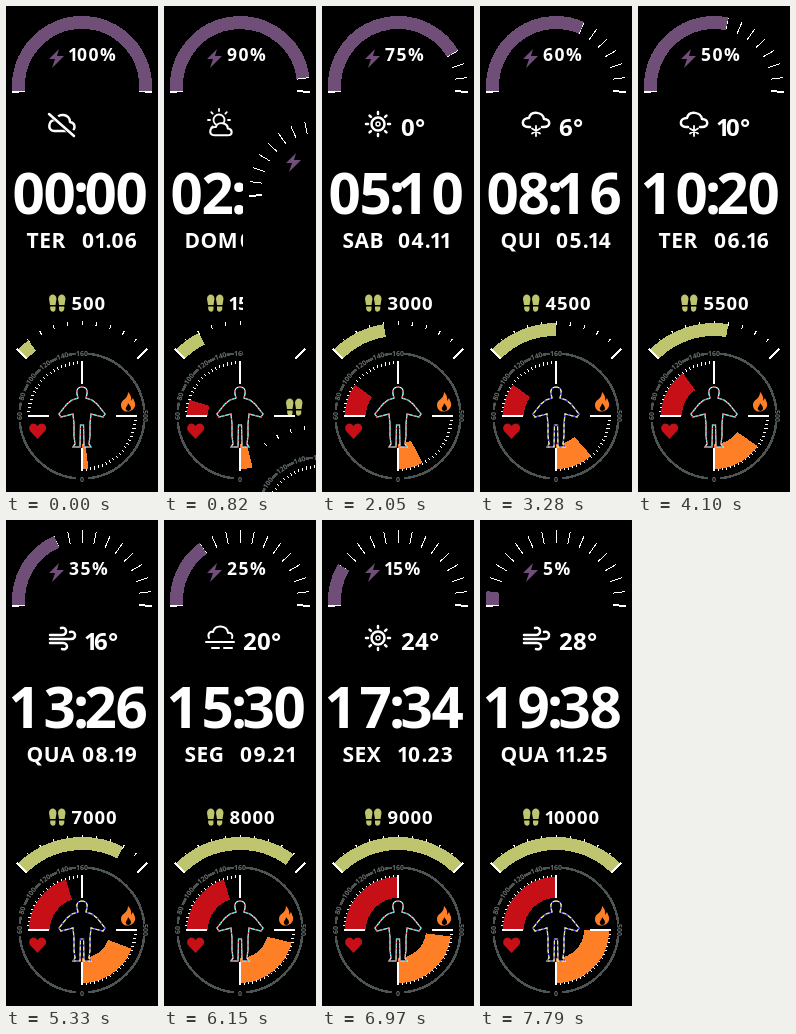
Animation, 152 px wide and 486 px high, one loop 8200 ms. Source, as an HTML page:

```html
<!DOCTYPE html>
<html lang="pt">
<head>
<meta charset="utf-8">
<style>
html, body { margin: 0; width: 100%; height: 100%; overflow: hidden; background: #000; }
svg { display: block; width: 152px; height: 486px; }
text { font-family: "Open Sans", "Noto Sans", sans-serif; font-weight: 700; fill: #fff; }
.crisp { shape-rendering: crispEdges; }
.tick { stroke: #fff; fill: none; shape-rendering: crispEdges; }
.line { stroke: #fff; stroke-width: 2; fill: none; shape-rendering: crispEdges; }
.small { font-size: 7px; fill: #66706d; text-anchor: middle; }
.icon { fill: none; stroke: #fff; stroke-width: 2.5; stroke-linecap: round; stroke-linejoin: round; }
</style>
</head>
<body>
<svg viewBox="0 0 152 486">
  <defs>
    <clipPath id="leftSide"><path d="M0 0H152V104H79V486H0Z"/></clipPath>
    <clipPath id="corner"><path d="M79 104H152V486H79Z"/></clipPath>
    <path id="man" d="M0-29C4-29 6-26 5-22L4-18 10-16 15-12 23-2 21 1 9-2 8 8 8 20 7 28 9 31 2 31 1.500 9H0M0-29C-4-29-6-26-5-22L-4-18-10-16-15-12-23-2-21 1-9-2-8 8-8 20-7 28-9 31-2 31-1.500 9H0"/>
  </defs>
  <rect width="152" height="486"/>
  <g id="base">
    <path id="batteryTicks" class="tick"/>
    <path id="batteryEnds" class="line"/>
    <path d="M53 43 43 53H49L46 62 58 50H51Z" fill="#6f4f78"/>
    <g fill="#bfc46f">
      <path id="sole" d="M43 293C43 287 50.500 287 50.500 293L49.500 299H44ZM44.200 300.500H49.500V303C49.500 307 44.500 306 44.200 303Z"/>
      <use href="#sole" transform="matrix(-1 0 0 1 102.500 0)"/>
    </g>
    <path id="stepTicks" class="tick"/>
    <circle class="crisp" cx="76" cy="410" r="62.500" fill="none" stroke="#4c5553" stroke-width="2.500"/>
    <g id="labels"></g>
    <path id="dialTicks" class="tick"/>
    <path d="M31.500 433 24 425C21 420 27 414 31.500 420 36 414 43 420 39 425Z" fill="#c70f18"/>
    <path d="M122 386C122 394 115 393 115 399 115 404 119 406 122 405.500 127 405 130 401 129 397L127 392 125 395C126 391 124 388 122 386Z" fill="#ff7f27"/>
    <path d="M122 397C122 400 119 401 120 403.500 121 406 125 405 125 402.500 125 400 123 399 122 397Z"/>
  </g>
  <g id="slip" clip-path="url(#corner)">
    <rect width="152" height="486"/>
    <use href="#base" x="79" y="104"/>
  </g>
  <g class="crisp" fill="none">
    <path id="battery" stroke="#6f4f78" stroke-width="13"/>
    <path id="steps" stroke="#bfc46f" stroke-width="13"/>
    <path id="heart" stroke="#c70f18" stroke-width="21"/>
    <path id="energy" stroke="#ff7f27" stroke-width="25"/>
  </g>
  <path id="marks" class="line"/>
  <path class="line" d="M22 410H43M110 410H131M76 355V378M76 442V465"/>
  <g fill="none" stroke-width="1.200">
    <use href="#man" x="76" y="410" fill="#000" stroke="#fff"/>
    <use id="manA" href="#man" x="76" y="410" stroke-dasharray="2 4"/>
    <use id="manB" href="#man" x="76" y="410" stroke-dasharray="2 4" stroke-dashoffset="3"/>
  </g>
  <g id="texts">
    <text id="charge" y="55" font-size="17.500"></text>
    <text id="temp" y="129.500" font-size="24"></text>
    <text id="clock" y="208" font-size="56.500"></text>
    <text id="day" x="20.500" y="242" font-size="21" letter-spacing=".5"></text>
    <text id="date" y="242" font-size="21"></text>
    <text id="count" y="304" font-size="18.500"></text>
  </g>
  <g id="weather" class="icon" transform="translate(56 118)"></g>
</svg>
<script>
const STEP = 410, COUNT = 20;
const $ = id => document.getElementById(id);
const pad = n => String(n).padStart(2, "0");
const days = ["DOM", "SEG", "TER", "QUA", "QUI", "SEX", "SAB"];

const point = (cy, r, deg) => {
  const a = deg * Math.PI / 180;
  return (76 + r * Math.cos(a)).toFixed(2) + " " + (cy - r * Math.sin(a)).toFixed(2);
};
const spoke = (cy, r0, r1, deg) => `M${point(cy, r0, deg)}L${point(cy, r1, deg)}`;
const spokes = (cy, r0, r1, from, gap, n) =>
  Array.from({ length: n }, (_, i) => spoke(cy, r0, r1, from + gap * i)).join("");
const arc = (cy, r, from, sweep) => sweep === 0 ? "" :
  `M${point(cy, r, from)}A${r} ${r} 0 ${+(Math.abs(sweep) > 180)} ${+(sweep < 0)} ${point(cy, r, from + sweep)}`;
const level = (p, n) => Math.min(n, Math.floor(n * p + 1 + 1e-6)) / n;

// Fixed parts of the gauges
$("batteryTicks").setAttribute("d", spokes(80, 57, 70, -5, 190 / 16, 17));
$("batteryEnds").setAttribute("d", spokes(80, 57, 70, -5, 190, 2));
$("stepTicks").setAttribute("d", spokes(408, 89, 93, 54, 9, 9));
$("marks").setAttribute("d", spokes(408, 78, 92, 45, 90, 2));
$("dialTicks").setAttribute("d",
  spokes(410, 52, 55, 94.5, 4.5, 19) + spokes(410, 52, 55, 274.5, 4.5, 19));

function label(text, deg, turn) {
  const [x, y] = point(410, 63, deg).split(" ");
  return `<g transform="translate(${x} ${y}) rotate(${turn})">` +
    `<rect x="-6" y="-3.500" width="12" height="7"/><text class="small" y="2.500">${text}</text></g>`;
}
$("labels").innerHTML = [0, 1, 2, 3, 4, 5].map(i =>
  label(60 + 20 * i, 180 - 18 * i, 18 * i - 90)).join("") + label("0", 270, 0) + label("500", 0, 90);

const cloud = "M-8 7H8C14 7 14-1 8-2 8-10-4-12-6-4-14-5-15 7-8 7Z";
const wind = "M-12-3H0C6-3 5-12-1-10M-12 1H9C15 1 14-8 8-6M-12 5H1C7 5 6 13 0 11";
const rays = r => Array.from({ length: 8 }, (_, i) => {
  const a = i * Math.PI / 4, c = Math.cos(a), s = Math.sin(a);
  return `M${r * c} ${r * s}L${(r + 2) * c} ${(r + 2) * s}`;
}).join("");
const icons = {
  none: `<path d="${cloud}"/><path d="M-12-11 12 11" stroke="#000" stroke-width="6"/><path d="M-13-10 12 12"/>`,
  partly: `<g transform="translate(-1 -4)" stroke-width="1.800"><circle r="5.500"/><path d="${rays(9)}"/></g>` +
    `<path d="${cloud}" fill="#000" transform="translate(1 6) scale(.85 .75)"/>`,
  sun: `<circle r="6.500"/><circle r="2" stroke-width="1.500"/><path d="${rays(10)}"/>`,
  snow: `<path d="M-6 3H-8C-15 3-15-6-7-6-5-14 7-12 8-5 15-5 15 3 8 3H6"/>` +
    `<path d="M0 2V12M-4 4.500 4 9.500M4 4.500-4 9.500" stroke-width="1.800"/>`,
  wind: `<path d="${wind}"/>`,
  fog: `<path d="M-11 0C-13-5-9-7-7-6-5-14 7-13 8-5 12-6 13-2 12 0M-14 4H14M-8 10H-1M4 10H12" stroke-width="2"/>`
};
const forecast = ["none", "partly", "partly", "partly", "sun", "sun", "sun", "snow", "snow", "snow",
  "snow", "fog", "fog", "wind", "wind", "fog", "fog", "sun", "wind", "wind"];

function setText(id, text, xs) {
  $(id).textContent = text;
  $(id).setAttribute("x", xs.join(" "));
}
// Digits share one advance; narrow characters take a tighter one
function flow(id, text, x, adv, narrow) {
  const xs = [];
  for (const ch of text) {
    xs.push(ch === "1" ? x - 1 : x);
    x += ch === "1" || ch === "-" ? narrow : ch === "." ? 6 : adv;
  }
  setText(id, text, xs);
}
// Clock digits sit at the left of fixed cells
function cells(id, text, xs) {
  setText(id, text, xs.map((x, i) => text[i] === "1" ? x - 4 : x));
}

function draw(k) {
  const charge = 100 - 5 * k, p = (k + 1) / COUNT;
  const month = Math.round(k * 10 / 19), date = 6 + k;
  const slip = k >= 2 && k <= 4;

  $("battery").setAttribute("d", arc(80, 63.5, 184.5, -189 * level(charge / 100, 16)));
  $("steps").setAttribute("d", arc(408, 84.5, 135, -90 * level(p, 10)));
  $("heart").setAttribute("d", arc(410, 42.5, 180, -18 * Math.ceil(k / 4)));
  $("energy").setAttribute("d", arc(410, 40.5, 270, 90 * level(p, 13)));

  flow("charge", charge + "%", 63, 11.5, 8);
  flow("temp", k ? 2 * k - 10 + "°" : "", 79, 14, 9);
  flow("count", String(500 * (k + 1)), 65.5, 11.5, 8.5);
  cells("clock", pad(k) + ":" + pad(2 * k), [6.5, 37.5, 67, 78.5, 109.5]);
  flow("date", pad(month + 1) + "." + pad(date), 76, 13.4, 10);
  $("day").textContent = days[new Date(Date.UTC(2026, month, date)).getUTCDay()];
  $("weather").innerHTML = icons[forecast[k]];

  const alt = [8, 13, 14, 18, 19].includes(k);
  $("manA").setAttribute("stroke", alt ? "#e5df45" : "#f04a55");
  $("manB").setAttribute("stroke", alt ? "#3a2bea" : "#35d6dc");

  $("slip").style.display = slip ? "" : "none";
  if (slip) $("texts").setAttribute("clip-path", "url(#leftSide)");
  else $("texts").removeAttribute("clip-path");
}

let shown = -1;
function tick() {
  const k = Math.floor(performance.now() / STEP) % COUNT;
  if (k !== shown) draw(shown = k);
  requestAnimationFrame(tick);
}
tick();
</script>
</body>
</html>
```
